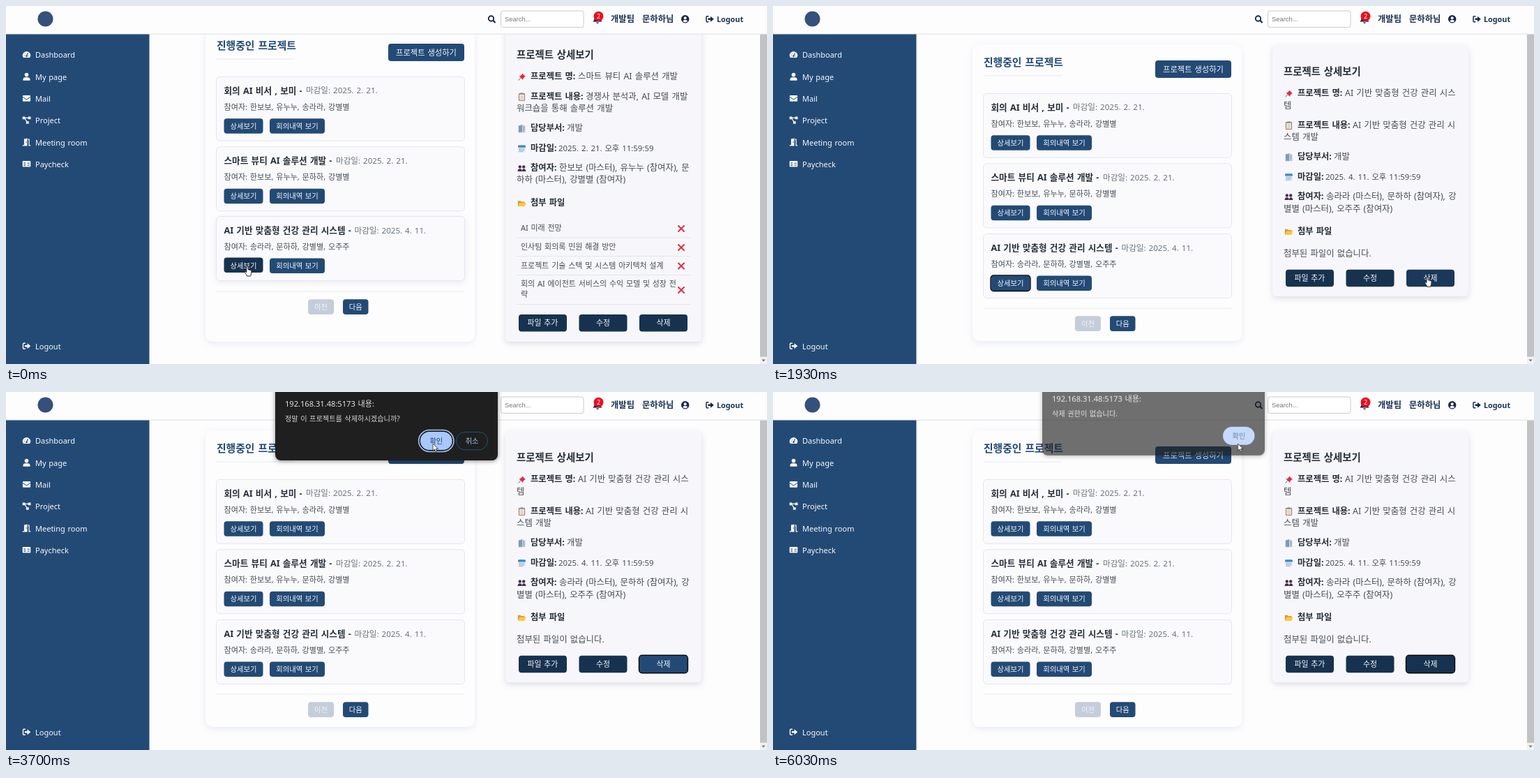
Animation of 1091 by 513 pixels, one loop 6060 ms. Source, as an HTML page:

```html
<!DOCTYPE html>
<html lang="ko">
<head>
<meta charset="utf-8">
<title>프로젝트 관리</title>
<style>
  html, body { margin: 0; width: 100%; height: 100%; overflow: hidden; background: #fdfdfe; }
  svg { display: block; width: 1091px; height: 513px; }
  text { font-family: 'Noto Sans', 'Noto Sans CJK KR', 'Noto Sans CJK JP', sans-serif; word-spacing: .08em; }
  .bold { font-weight: 700; }
  .medium { font-weight: 500; }
  .mid { text-anchor: middle; }
  .card { filter: drop-shadow(0 3px 5px rgba(60, 80, 140, .1)); }
  .panel { filter: drop-shadow(0 3px 4px rgba(40, 50, 80, .15)); }
  .dialog { filter: drop-shadow(0 1px 3px rgba(0, 0, 0, .45)); }

  .page, .before, .after, .lift, .glow, .view, .view-ring, .del, .del-ring,
  .ask, .ask-ring, .deny, .deny-ring, .cursor, .hand, .arrow, .beam {
    animation: 6060ms linear infinite;
  }
  .page { animation-name: page; animation-timing-function: step-end; }
  .before { animation-name: before; animation-timing-function: step-end; }
  .after { animation-name: after; animation-timing-function: step-end; }
  .lift { animation-name: lift; }
  .glow { animation-name: glow; filter: drop-shadow(0 2px 4px rgba(40, 60, 110, .1)); }
  .view { animation-name: view; }
  .view-ring { animation-name: view-ring; animation-timing-function: step-end; }
  .del { animation-name: del; }
  .del-ring { animation-name: del-ring; animation-timing-function: step-end; }
  .ask { animation-name: ask; }
  .ask-ring { animation-name: ask-ring; animation-timing-function: step-end; }
  .deny { animation-name: deny; }
  .deny-ring { animation-name: deny-ring; animation-timing-function: step-end; }
  .cursor { animation-name: cursor; }
  .hand { animation-name: hand; animation-timing-function: step-end; }
  .arrow { animation-name: arrow; animation-timing-function: step-end; }
  .beam { animation-name: beam; animation-timing-function: step-end; }

  @keyframes page { 0% { transform: translateY(-24px); } 5.5%, 100% { transform: none; } }
  @keyframes before { 0% { visibility: visible; } 5.5%, 100% { visibility: hidden; } }
  @keyframes after { 0% { visibility: hidden; } 5.5%, 100% { visibility: visible; } }
  @keyframes lift { 0%, 16% { transform: translateY(-1px); } 19%, 100% { transform: translateY(0); } }
  @keyframes glow { 0%, 16% { opacity: 1; } 19%, 100% { opacity: 0; } }
  @keyframes view {
    0%, 5.5% { fill: #17324f; transform: translateY(-1px); }
    8.5%, 100% { fill: #234a75; transform: translateY(0); }
  }
  @keyframes view-ring { 0% { opacity: 0; } 5.5% { opacity: 1; } 41.5%, 100% { opacity: 0; } }
  @keyframes del {
    0%, 31% { fill: #17324f; }
    34%, 75.8% { fill: #234a75; }
    76.4%, 98.5% { fill: #1e4067; }
    99.4%, 100% { fill: #17324f; }
  }
  @keyframes del-ring { 0% { opacity: 0; } 41.5%, 100% { opacity: 1; } }
  @keyframes ask {
    0%, 43.4% { opacity: 0; transform: translateY(-20px); }
    46.2%, 72.7% { opacity: 1; transform: translateY(0); }
    73.3% { opacity: 1; transform: translateY(-1.6px); }
    75.7%, 100% { opacity: 0; transform: translateY(-20px); }
  }
  @keyframes ask-ring { 0% { opacity: 1; } 72.7%, 100% { opacity: 0; } }
  @keyframes deny {
    0%, 75.9% { opacity: 0; transform: translateY(-20px); }
    78.7%, 98.5% { opacity: 1; transform: translateY(0); }
    100% { opacity: .47; transform: translateY(-10.6px); }
  }
  @keyframes deny-ring { 0% { opacity: 1; } 98.5%, 100% { opacity: 0; } }
  @keyframes cursor {
    0% { transform: translate(346px, 373px); }
    6.5% { transform: translate(346px, 373px); animation-timing-function: ease-in-out; }
    22.6% { transform: translate(778px, 353px); animation-timing-function: ease-in-out; }
    33% { transform: translate(942px, 389px); }
    43.5% { transform: translate(942px, 389px); animation-timing-function: ease-in; }
    50% { transform: translate(798px, 338px); animation-timing-function: ease-out; }
    58% { transform: translate(612px, 74px); }
    76% { transform: translate(612px, 74px); animation-timing-function: ease-out; }
    85.3% { transform: translate(645.5px, 74px); animation-timing-function: ease-in-out; }
    91%, 100% { transform: translate(666.5px, 74px); }
  }
  @keyframes hand {
    0% { visibility: visible; } 5.6% { visibility: hidden; }
    30.5% { visibility: visible; } 53%, 100% { visibility: hidden; }
  }
  @keyframes arrow {
    0% { visibility: hidden; } 5.6% { visibility: visible; } 19.5% { visibility: hidden; }
    25% { visibility: visible; } 30.5% { visibility: hidden; } 53%, 100% { visibility: visible; }
  }
  @keyframes beam { 0% { visibility: hidden; } 19.5% { visibility: visible; } 25%, 100% { visibility: hidden; } }
</style>
</head>
<body>
<svg id="stage" viewBox="0 0 1091 513" xmlns="http://www.w3.org/2000/svg"></svg>
<script>
const NAVY = '#234a75', DEEP = '#17324f', INK = '#262e39', SOFT = '#454c55';

// y is the optical middle of the line
const text = (x, y, size, fill, str, cls = '') =>
  `<text x="${x}" y="${(y + size * .36).toFixed(2)}" font-size="${size}" fill="${fill}" class="${cls}">${str}</text>`;
const box = (x, y, w, h, r, fill, more = '') =>
  `<rect x="${x}" y="${y}" width="${w}" height="${h}" rx="${r}" fill="${fill}" ${more}/>`;
const line = (x1, x2, y, color) => `<path d="M${x1} ${y}H${x2}" stroke="${color}" stroke-width=".8"/>`;
const at = (x, y, inner) => `<g transform="translate(${x} ${y})">${inner}</g>`;
const group = (cls, inner) => `<g class="${cls}">${inner}</g>`;
const button = (x, y, w, h, label, size = 10.3, fill = NAVY, ink = '#f4f7fb') =>
  box(x, y, w, h, 4, fill) + text(x + w / 2, y + h / 2, size, ink, label, 'mid');
const ring = (x, y, w, h, cls) =>
  box(x - .5, y - .5, w + 1, h + 1, 4.4, 'none', `class="${cls}" stroke="#05080d" stroke-width="1.4"`);

// Icons, centred on 0,0 and drawn in the current colour
const icon = {
  gauge: `<path d="M-4.6 4.2A5.6 5.6 0 1 1 4.6 4.2Z" fill="currentColor"/><path d="M0 2L2-2.6M-3.4 1h.6M-2.4-1.8l.4.4M3 1h.6" stroke="${NAVY}" stroke-width="1.1"/><circle cy="2" r="1.3" fill="${NAVY}"/>`,
  user: `<circle cy="-2.7" r="2.8" fill="currentColor"/><path d="M-5 5.5V4Q-5 1-2 1H2Q5 1 5 4V5.5Z" fill="currentColor"/>`,
  mail: `<rect x="-5.6" y="-4.2" width="11.2" height="8.6" rx="1.2" fill="currentColor"/><path d="M-5.6-2L0 1.8 5.6-2" fill="none" stroke="${NAVY}"/>`,
  nodes: `<path d="M-4-3.3H4M-3-3L1.4 3.6" stroke="currentColor" stroke-width="1.2"/><path d="M-5.8-5h3.8v3.6h-3.8ZM2.2-5H6v3.6H2.2ZM-.6 1.6h3.8v3.6H-.6Z" fill="currentColor"/>`,
  door: `<path d="M-3.6-4.6L1-5.6V5.4H-5.8V4.2H-3.6ZM1.8-4.4H4.2V4.2H5.8V5.4H3V-3.2H1.8Z" fill="currentColor"/><circle cx="-.4" r=".7" fill="${NAVY}"/>`,
  check: `<rect x="-5.8" y="-4.2" width="11.6" height="8.4" rx="1" fill="currentColor"/><path d="M-4-1.6h2.6M-4 .4h2.6M-4 2.3h2.6M1-1H4.4M1 1.8H4.4" stroke="${NAVY}" stroke-width=".9"/>`,
  exit: `<path d="M-1.6-4H-4Q-5-4-5-3V3Q-5 4-4 4H-1.6" fill="none" stroke="currentColor" stroke-width="1.5"/><path d="M-2.6-1.3H1V-4L5.8 0 1 4V1.3H-2.6Z" fill="currentColor"/>`,
  search: `<circle cx="-1" cy="-1" r="3.7" fill="none" stroke="currentColor" stroke-width="1.9"/><path d="M1.8 1.8L5 5" stroke="currentColor" stroke-width="2.2"/>`,
  bell: `<path d="M-6.5 4Q-4.4 2-4.4-1.5Q-4.4-6 0-6Q4.4-6 4.4-1.5Q4.4 2 6.5 4ZM-2 5H2Q1.4 6.6 0 6.6T-2 5Z" fill="currentColor"/>`,
  face: `<circle r="5.7" fill="currentColor"/><circle cy="-1.5" r="2" fill="#fdfdfe"/><path d="M-3.4 3.3Q-2.8 1.3-1 1.3H1Q2.8 1.3 3.4 3.3Q0 5.8-3.4 3.3Z" fill="#fdfdfe"/>`,
  pin: `<path d="M-1.5 1L-5 5" stroke="#8c98a5" stroke-width="1.1"/><path d="M.6-5L5.4-.4 3.9.2 2 2.2 1.6 4.4-4-1.2-1.8-1.6.2-3.6Z" fill="#dd2e44"/>`,
  clip: `<rect x="-4.6" y="-5" width="9.2" height="11" rx="1" fill="#b98050"/><path d="M-3.4-3.4H3.4V4.8H-3.4Z" fill="#eef2f5"/><path d="M-2-5.8H2V-3.2H-2Z" fill="#8595a3"/><path d="M-2.3-1H2.3M-2.3 1H2.3M-2.3 3H2.3" stroke="#9db2c4" stroke-width=".8"/>`,
  tower: `<path d="M-4.8-4L.6-5.6V5.6H-4.8Z" fill="#8aa5bd"/><path d="M.6-5.6L5-3.6V5.6H.6Z" fill="#bccbd8"/><path d="M-3.2-3V4M-1-3.4V4M2.8-2.6V4" stroke="#5d7f9e" stroke-width=".9" stroke-dasharray="1.2 .8"/>`,
  date: `<rect x="-5.4" y="-5" width="10.8" height="10.4" rx="1.2" fill="#e4ebf2"/><path d="M-5.4-1.9V-4Q-5.4-5-4.2-5H4.2Q5.4-5 5.4-4V-1.9Z" fill="#3b88c3"/><path d="M-3.8 0H4M-3.8 2H4M-3.8 4H2" stroke="#5d8fb8" stroke-width="1" stroke-dasharray="1.2 .8"/>`,
  people: `<g fill="#43304f"><circle cx="-2.7" cy="-2.2" r="2.2"/><circle cx="2.7" cy="-2.2" r="2.2"/><path d="M-6 4.4Q-6 .6-2.7.6T.2 4.4ZM.4 4.4Q.4.6 2.9.6T6 4.4Z"/></g>`,
  folder: `<path d="M-5.6 4.4V-3.4H-2L-.8-2.2H4V4.4Z" fill="#d99a2b"/><path d="M-5.4 4.6L-3.4-.6H6L4 4.6Z" fill="#ffc83d"/>`,
  cross: `<path d="M-4-4L4 4M4-4L-4 4" stroke="#dd2e44" stroke-width="2" stroke-linecap="round"/>`
};

function projectCard(y, title, dateX, date, who, hot) {
  const edge = 'stroke="#e1e4ee" stroke-width=".9"';
  const view = hot
    ? group('view', `<rect x="312.5" y="${y + 60}" width="56" height="21.5" rx="4"/>`) +
      ring(312.5, y + 60, 56, 21.5, 'view-ring') +
      text(340.5, y + 70.7, 10.3, '#f4f7fb', '상세보기', 'mid')
    : button(312.5, y + 60, 56, 21.5, '상세보기');
  const body = (hot ? box(301.5, y, 356, 92, 5, '#f9f9fc', 'class="glow"') : '') +
    box(301.5, y, 356, 92, 5, '#fafafd', edge) +
    text(312.5, y + 20, 12.6, INK, title, 'bold') +
    text(dateX, y + 20, 11.6, '#69727d', '마감일: ' + date) +
    text(312.5, y + 43.2, 11.1, SOFT, '참여자: ' + who) +
    view + button(378, y + 60, 79, 21.5, '회의내역 보기');
  return hot ? group('lift', body) : body;
}

const row = (y, pic, label, x, value, size = 12.4) =>
  at(739.5, y + .6, icon[pic]) + text(752, y, 12.3, INK, label, 'bold') + text(x, y, size, SOFT, value);
const more = (y, str) => text(732, y, 12.4, SOFT, str);

const panelTop = bottom =>
  box(716, 56, 281, bottom - 56, 5, '#f7f7fb', 'class="panel"') +
  text(732, 93.5, 14.4, INK, '프로젝트 상세보기', 'bold');

const files = [
  [342.5, 'AI 미래 전망'], [369.5, '인사팀 회의록 민원 해결 방안'],
  [396, '프로젝트 기술 스택 및 시스템 아키텍처 설계'],
  [422.5, '회의 AI 에이전트 서비스의 수익 모델 및 성장 전'], [437.5, '략']
];

const detailBefore = panelTop(505) +
  row(125, 'pin', '프로젝트 명:', 820, '스마트 뷰티 AI 솔루션 개발') +
  row(153.5, 'clip', '프로젝트 내용:', 831, '경쟁사 분석과, AI 모델 개발') + more(171, '워크숍을 통해 솔루션 개발') +
  row(199, 'tower', '담당부서:', 804, '개발') +
  row(228, 'date', '마감일:', 792, '2025. 2. 21. 오후 11:59:59', 11.4) +
  row(256, 'people', '참여자:', 793, '한보보 (마스터), 유누누 (참여자), 문') + more(273, '하하 (마스터), 강별별 (참여자)') +
  row(306, 'folder', '첨부 파일', 0, '') +
  files.map(([y, name]) => text(738, y, 11, SOFT, name)).join('') +
  [343, 370, 396.5, 431].map(y => at(968, y, icon.cross)).join('') +
  [356, 382.5, 409.5, 451.5].map(y => line(732, 981, y, '#dfe1e8')).join('') +
  button(735, 466, 69, 24.5, '파일 추가', 10.9, DEEP) +
  button(821.5, 466, 69, 24.5, '수정', 10.9, DEEP) +
  button(908, 466, 69, 24.5, '삭제', 10.9, DEEP);

const detailAfter = panelTop(416) +
  row(125, 'pin', '프로젝트 명:', 820, 'AI 기반 맞춤형 건강 관리 시스') + more(142.3, '템') +
  row(170.5, 'clip', '프로젝트 내용:', 831, 'AI 기반 맞춤형 건강 관리 시') + more(187.7, '스템 개발') +
  row(216, 'tower', '담당부서:', 804, '개발') +
  row(244.7, 'date', '마감일:', 792, '2025. 4. 11. 오후 11:59:59', 11.4) +
  row(273, 'people', '참여자:', 793, '송라라 (마스터), 문하하 (참여자), 강') + more(290.3, '별별 (마스터), 오주주 (참여자)') +
  row(322.5, 'folder', '첨부 파일', 0, '') + more(355, '첨부된 파일이 없습니다.') +
  button(735, 377.7, 69, 24.5, '파일 추가', 10.9, DEEP) +
  button(821.5, 377.7, 69, 24.5, '수정', 10.9, DEEP) +
  group('del', '<rect x="908" y="377.7" width="69" height="24.5" rx="4"/>') +
  ring(908, 377.7, 69, 24.5, 'del-ring') +
  text(942.5, 390, 10.9, '#f4f7fb', '삭제', 'mid');

const projects =
  group('before', box(286, 55, 386, 450, 10, '#fdfdfe', 'class="card"')) +
  group('after', box(286, 55, 386, 425, 10, '#fdfdfe', 'class="card"')) +
  text(302, 81, 14.8, NAVY, '진행중인 프로젝트', 'bold') + line(302, 414, 100, '#dfe4ec') +
  button(548, 78, 109, 25, '프로젝트 생성하기', 11.3) +
  projectCard(125.3, '회의 AI 비서 , 보미 -', 430, '2025. 2. 21.', '한보보, 유누누, 송라라, 강별별') +
  projectCard(225.8, '스마트 뷰티 AI 솔루션 개발 -', 473, '2025. 2. 21.', '한보보, 유누누, 문하하, 강별별') +
  projectCard(326.5, 'AI 기반 맞춤형 건강 관리 시스템 -', 499.5, '2025. 4. 11.', '송라라, 문하하, 강별별, 오주주', true) +
  line(302, 657, 433, '#e3e6ec') +
  button(433, 444.2, 37, 21.8, '이전', 10.3, '#c5cddb', '#f1f4f9') +
  button(483, 444.2, 36.5, 21.8, '다음');

const menu = [
  [70.5, 'gauge', 'Dashboard'], [102, 'user', 'My page'], [133, 'mail', 'Mail'], [164.3, 'nodes', 'Project'],
  [195.7, 'door', 'Meeting room'], [227, 'check', 'Paycheck'], [488, 'exit', 'Logout']
];
const sidebar = box(0, 40, 205.5, 473, 0, NAVY) +
  menu.map(([y, pic, label]) =>
    `<g color="#f6f9fd">${at(29.5, y - .7, icon[pic])}</g>` + text(42, y, 11, '#f6f9fd', label, 'medium')).join('');

const header = box(0, 0, 1091, 40, 0, '#fdfdfe') + line(0, 1091, 40.2, '#d5d8dd') +
  '<circle cx="56.5" cy="18.5" r="11" fill="#34507b"/>' +
  `<g color="#15294a">${at(696.5, 19, icon.search)}${at(848, 18.5, icon.bell)}${at(973.7, 18.7, icon.face)}${at(1009, 18.7, icon.exit)}</g>` +
  box(709.5, 7, 118.5, 23.5, 3, '#fff', 'stroke="#c3c6cb" stroke-width=".9"') +
  `<text x="715" y="21.8" font-size="9.4" fill="#777" style="font-family:'Liberation Sans',Arial,sans-serif">Search...</text>` +
  '<circle cx="849.5" cy="14.8" r="7" fill="#e8101c"/>' + text(849.5, 14.8, 9, '#fff', '2', 'mid') +
  text(867, 18.7, 12.3, '#1c3353', '개발팀', 'bold') + text(912, 18.7, 12.3, '#1c3353', '문하하님', 'bold') +
  text(1019, 19, 10.8, '#1c3353', 'Logout', 'bold');

const scrollbar = box(1081, 40.6, 10, 472.4, 0, '#f1f1f2') + box(1081, 40.6, 10, 462, 0, '#c1c2c4') +
  '<path d="M1083.4 506.5h5.2l-2.6 3Z" fill="#707274"/>';

const pill = (x, label, halo) =>
  box(x, 57, 45.5, 26, 13, '#a8c7fa') + text(x + 22.8, 70, 10.2, '#2a4672', label, 'mid') +
  box(x - 2.4, 54.6, 50.3, 30.8, 15.4, 'none', `class="${halo}" stroke="#a8c7fa" stroke-width="1.5"`);
const dialog = (cls, message, actions) => group(cls,
  box(386, -30, 319, 128, 8, '#1f1f1f', 'class="dialog"') +
  text(400, 17, 11.1, '#e3e3e3', '192.168.31.48:5173 내용:') +
  text(400, 38.5, 10.2, '#d2d4d6', message) + actions);

const askBox = dialog('ask', '정말 이 프로젝트를 삭제하시겠습니까?',
  pill(594, '확인', 'ask-ring') +
  box(645.5, 57.4, 45, 25.4, 12.7, 'none', 'stroke="#1c5678" stroke-width="1"') +
  text(668, 70, 10.2, '#a8c7fa', '취소', 'mid'));
const denyBox = dialog('deny', '삭제 권한이 없습니다.', pill(645, '확인', 'deny-ring'));

const pointer = group('cursor',
  '<path class="hand" d="M-1.2 1Q-1.2 0-.1 0T1 1V4.6L4.6 5.6Q6 6 6 7.4L5.4 10.8 4.7 14H-.5L-1.2 12.2-3.6 8.7Q-4 7.4-2.7 7.4L-1.2 8.6Z" fill="#fff" stroke="#111" stroke-width=".9"/>' +
  '<path class="arrow" d="M0 0V10.2L2.4 8 4 11.7 5.7 11 4.1 7.4H7.4Z" fill="#fff" stroke="#111" stroke-width=".7"/>' +
  '<path class="beam" d="M-2-4.5H-.6L0-4 .6-4.5H2M0-4V4M-2 4.5H-.6L0 4 .6 4.5H2" fill="none" stroke="#333" stroke-width=".9"/>');

document.getElementById('stage').innerHTML =
  box(0, 0, 1091, 513, 0, '#fdfdfe') +
  group('page', projects + group('before', detailBefore) + group('after', detailAfter)) +
  sidebar + scrollbar + header + askBox + denyBox + pointer;
</script>
</body>
</html>
```
